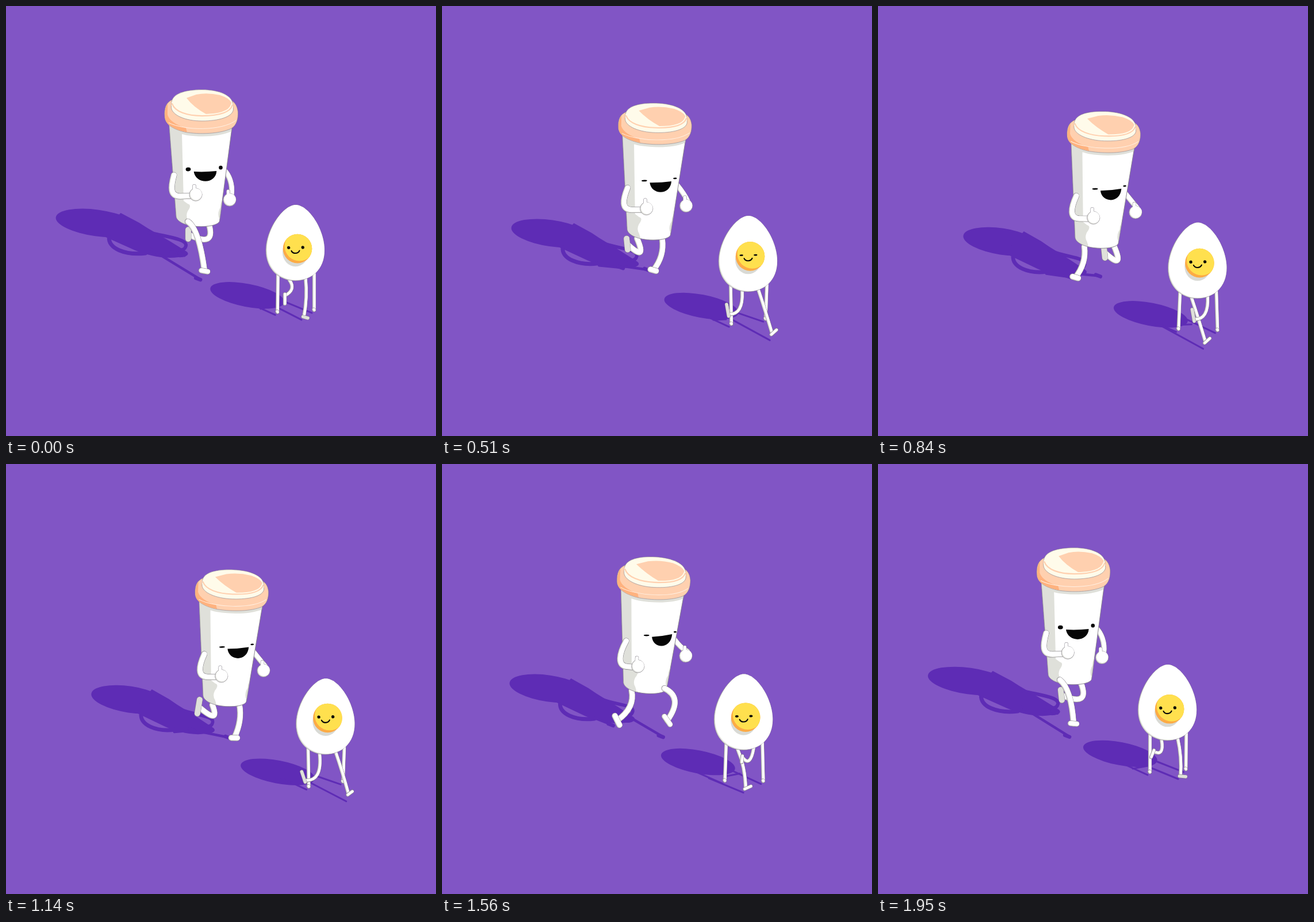
Recreate the animation shown at these times as an HTML page with a canvas. Size 748 by 748 pixels, loop 1.98 s.

```html
<!DOCTYPE html>
<html lang="en">
<head>
<meta charset="utf-8">
<title>Breakfast walk</title>
<style>
html, body { margin: 0; width: 100%; height: 100%; overflow: hidden; background: #8155c5; }
canvas { display: block; width: 748px; height: 748px; }
</style>
</head>
<body>
<canvas id="stage" width="748" height="748"></canvas>
<script>
const ctx = document.getElementById('stage').getContext('2d');
const LOOP = 1980, STRIDE = 660, STEP = 30, TAU = Math.PI * 2;
const BG = '#8155c5', SHADE = '#5e2cb5', WHITE = '#ffffff', GRAY = '#dfe0da', LINE = '#85808a', INK = '#060606';
const PEACH = '#ffd0af', ORANGE = '#ffb27f', CREAM = '#fffbea';

// One stride of a leg: phase, knee x y, ankle x y, toe x y, shadow drop
const CUP_STRIDE = [
  [0, 17, 28, 29, 86, 5.5, 1, 14],
  [.25, -1, 28, -12.5, 55, 5, .5, -1],
  [.364, -3, 28, -25, 52, 4, 8, 8],
  [.409, -2, 29, -29, 45, 3.5, 9, 14],
  [.455, 0, 27, -34, 21, 1, 9, 30],
  [.5, -3, 25, -36, 17, 0, 8, 35],
  [.727, 1, 19, -24, 3, -2, 12, 41],
  [.773, 5, 24, -17, 10, 1, 9.5, 41],
  [.864, 18, 22, 5, 56, 5, 7, 28],
  [.909, 16, 23, 18, 76, 5.5, 1, 22],
  [.955, 16, 27, 24, 76, 5.5, .5, 22]
];
const EGG_STRIDE = [
  [0, 4, 15, -8, 27, 0, 14, 10],
  [.25, 12, 37, 24, 76, 7, -6, 8],
  [.364, 10, 32, 14, 68, 9, -4, 3],
  [.409, 9, 28, 10, 67, 9, -2, 2],
  [.455, 5, 33, 5, 66, 9, 1, 1],
  [.5, 1, 33, -3, 67, 7, 2, 1],
  [.727, -4, 36, -26, 46, -5, -15, 2],
  [.773, -5, 31, -24, 40, -3, -17, 5],
  [.864, -8, 22, -20, 16, -1, 9, 25],
  [.909, -3, 18, -15, 13, -1, 9, 30],
  [.955, -1, 20, -14, 20, -4, 10, 20]
];

const P = d => new Path2D(d);
const CUP = P('M283.5 203L296 366C297 375 313 383 336 383.5C355 384 370 380 371.5 374L394 205Z');
const RIM = P('M289 163C278 168 275 178 276 192C276 205 290 215 315 220C345 224 375 221 392 213C402 207 404 195 403.5 184C402 172 397 166 388 162Z');
const RIM_DARK = P('M281 169C273 185 275 204 286 209C295 215 305 218 315 219.5L313 212C298 208 284 200 281 189Z');
const RIM_LINE = P('M283 203C310 217 375 218 400 199');
const CAP = P('M288 167C290 152 312 145.5 341 145.5C370 145.5 393 155 394.5 170L395.5 180C394 193 370 200 341 200C312 200 289 190 287.5 177Z');
const CAP_EDGE = P('M289 170C294 184 315 191 341 191C368 191 390 186 394 172');
const EGG = P('M1 0C23 0 51 42 51 79C51 112 28 132 0 132C-28 132 -51 112 -51 79C-51 42 -21 0 1 0Z');
const CUP_SHADOW = P('M200 360L232 377L246 386L285 409L314 427C322 433 310 438 300 437C275 441 245 433 225 425L165 398Z');

function fill(path, color, line) {
  ctx.fillStyle = color;
  ctx.fill(path);
  if (line) stroke(path, line, .6);
}

function stroke(path, color, width) {
  ctx.strokeStyle = color;
  ctx.lineWidth = width;
  ctx.stroke(path);
}

function oval(x, y, rx, ry = rx, rot = 0) {
  const p = new Path2D();
  p.ellipse(x, y, rx, ry, rot, 0, TAU);
  return p;
}

function within(path, draw) {
  ctx.save();
  ctx.clip(path);
  draw();
  ctx.restore();
}

function tube(path, width, color = WHITE) {
  stroke(path, LINE, width + .8);
  stroke(path, GRAY, width - .3);
  ctx.save();
  ctx.translate(.7, -.3);
  stroke(path, color, width - 1.9);
  ctx.restore();
}

// Smooth periodic interpolation through a stride table
function sample(rows, phase) {
  const n = rows.length, p = ((phase % 1) + 1) % 1;
  let i = n - 1;
  while (rows[i][0] > p) i--;
  const row = k => rows[(k + n) % n];
  const at = k => row(k)[0] + Math.floor(k / n);
  const span = at(i + 1) - at(i), u = (p - at(i)) / span;
  return rows[0].map((_, c) => {
    const a = row(i)[c], b = row(i + 1)[c];
    const ma = (b - row(i - 1)[c]) / (at(i + 1) - at(i - 1)) * span;
    const mb = (row(i + 2)[c] - a) / (at(i + 2) - at(i)) * span;
    const u2 = u * u, u3 = u2 * u;
    return a * (2 * u3 - 3 * u2 + 1) + ma * (u3 - 2 * u2 + u) + b * (3 * u2 - 2 * u3) + mb * (u3 - u2);
  }).slice(1);
}

function makeLeg(rows, phase, hx, hy, heel) {
  const [kx, ky, ax, ay, tx, ty, drop] = sample(rows, phase);
  const x = hx + ax, y = hy + ay;
  return {
    phase: phase % 1, hx, hy, x, y, drop,
    limb: P(`M${hx} ${hy}Q${hx + 2 * kx - ax / 2} ${hy + 2 * ky - ay / 2} ${x} ${y}`),
    foot: P(`M${x - heel * tx} ${y - heel * ty}L${x + tx} ${y + ty}`)
  };
}

function drawLeg(leg, width, footWidth) {
  const lifted = leg.phase > .45 && leg.phase < .83;
  tube(leg.limb, width);
  tube(leg.foot, footWidth, lifted ? GRAY : WHITE);
}

// Eyes: shut goes from 0 (open) to 1 (a dash)
function eye(x, y, rx, ry, shut) {
  fill(oval(x, y, rx + shut * .5, ry + (1.4 - ry) * shut, -.05), INK);
}

const ramp = (t, a, b) => Math.min(1, Math.max(0, (t - a) / (b - a)));

function cupShadow(m, legs) {
  const head = 63 * m.s + 12 * m.w ** 3 - 1;
  ctx.save();
  ctx.translate(87 + head, 34 * m.s);
  ctx.scale((231 + 49 * m.s - head) / 231, 1);
  ctx.translate(-87, 0);
  fill(oval(159, 377.5, 72, 23, .14), SHADE);
  fill(CUP_SHADOW, SHADE);
  stroke(P('M180 402C178 422 208 434 243 430'), SHADE, 7);
  stroke(P('M250 394C280 ' + (402 + 6 * m.w) + ' 315 405 313 417C311 427 300 425 293 423'), SHADE, 6);
  ctx.restore();
  ctx.save();
  ctx.translate(m.x, m.y);
  for (const l of legs) {
    const tx = l.x - 8, ty = l.y + l.drop;
    stroke(P(`M${l.hx - 66} ${l.hy + 47}L${tx} ${ty}`), SHADE, 4.5);
    stroke(P(`M${tx - 7} ${ty - 2}L${tx + 1} ${ty + 1}`), SHADE, 6.5);
  }
  ctx.restore();
}

function hand(x, y) {
  const thumb = P(`M${x - 2.5} ${y - 6}L${x - 2.5} ${y - 15}`);
  stroke(thumb, LINE, 6.4);
  fill(oval(x, y, 11.2), GRAY, LINE);
  fill(oval(x + .7, y - .7, 10.2), WHITE);
  stroke(thumb, WHITE, 5.4);
}

function cupFace(m) {
  const d = 8.3 * (1 - m.cos) + .8 * m.sin, k = d / 16;
  const shut = ramp(m.t, 400, 470) * (1 - ramp(m.t, 1620, 1710));
  const cx = 346.5 + .87 * d, r = 19.8 - 2.6 * k;
  const left = 288 - 2 * k, right = 287 - 8 * k, low = 304 - 4 * k;
  const bend = low + (low - (left + right) / 2) / 3 + 1;
  fill(P(`M${cx - r} ${left}Q${cx} ${(left + right) / 2 + 1.5} ${cx + r} ${right}` +
    `C${cx + r - 1} ${bend} ${cx - r + 3} ${bend} ${cx - r} ${left}Z`), INK);
  eye(317 + 1.05 * d, 284, 4.4, 3.4, shut);
  eye(373.5 + .55 * d, 281 - 6 * k, 3.3 - 1.5 * k, 3.4, shut);
}

function cupLid(m) {
  fill(RIM, PEACH, LINE);
  within(RIM, () => fill(RIM_DARK, ORANGE));
  stroke(RIM_LINE, '#fff1e4', 1);
  fill(CAP, CREAM, LINE);
  within(CAP, () => {
    const a = 7 * m.w;
    fill(P(`M${314 - a} 160L${331 - a / 2} 154Q350 150 372 155Q388 160 392 168L391 179Q384 184 372 187L348 188Q326 176 ${314 - a} 160Z`), PEACH);
    stroke(CAP_EDGE, CREAM, 6);
    stroke(CAP_EDGE, PEACH, 2.2);
  });
}

function drawCup(m, legs) {
  const front = l => l.phase > .83 || l.phase < .15;
  const w3 = m.w ** 3, q = Math.sin(m.w * Math.PI / 2);
  const place = draw => {
    ctx.save();
    ctx.translate(m.x, m.y);
    draw();
    ctx.restore();
  };
  // The lid foreshortens as the cup tips back on each landing
  const squash = () => {
    ctx.translate(0, 145.5);
    ctx.scale(1, 1 - .065 * m.pitch);
    ctx.translate(0, -145.5);
  };
  place(() => legs.filter(l => !front(l)).forEach(l => drawLeg(l, 10, 10)));
  place(() => {
    ctx.translate(335.5, 383);
    ctx.rotate(m.lean);
    ctx.translate(-335.5, -383);
    const rx = 389 + 13.5 * q, ry = 337 - 23 * q;
    tube(P(`M380 286C387 ${293 + 2 * q} ${395 + q} ${309 - 6 * q} ${rx + 3 - q} ${ry - 8}`), 9);
    hand(rx, ry);
    fill(CUP, WHITE, LINE);
    within(CUP, () => {
      const edge = 306 - 4 * m.w;
      fill(P(`M270 190L${edge} 190L${edge} 222L309 339L316 344Q324 346 316 357Q312 366 317 373L322 388L270 388Z`), GRAY);
      fill(P('M384 328Q372 340 373 350Q368 358 370 368L384 368Z'), GRAY);
      squash();
      ctx.translate(0, 5);
      fill(RIM, GRAY);
    });
    stroke(CUP, LINE, .6);
    ctx.save();
    squash();
    cupLid(m);
    ctx.restore();
    ctx.save();
    ctx.translate(0, -3.5 * m.pitch);
    cupFace(m);
    ctx.restore();
    const hx = 330 - 18 * w3, hy = 328 + 16 * w3, sx = 292 + 6 * m.w;
    tube(P(`M${sx} 294C${286 + m.w - 3 * w3} ${316 + 4 * w3} ${285 + m.w - 3 * w3} ${331 + 12 * w3} ${303 - 6 * w3} ${331 + 13 * w3}L${hx - 6} ${hy + 2}`), 10);
    hand(hx, hy);
  });
  place(() => legs.filter(front).forEach(l => drawLeg(l, 10, 9)));
}

function drawEgg(m) {
  const h = m.p * 2;
  const bob = 10.5 * ((1 + Math.cos(TAU * (h - .71))) / 2) ** 2;
  const x = 55.5 * m.s, y = 28 * m.s + bob - .6;
  const yolkY = 72.8 + 4.5 * Math.sin(TAU * (h - .64));
  const post = (hx, hy, dx, len) => ({
    hx, hy, x: hx + dx, y: hy + len, drop: 1, phase: 0,
    limb: P(`M${hx} ${hy}L${hx + dx} ${hy + len}`),
    foot: P(`M${hx + dx - .6} ${hy + len - 1}L${hx + dx} ${hy + len}`)
  });
  const legs = [
    post(473, 466, -.7 - 2 * m.sin, 65.5 - 1.5 * m.sin),
    post(536, 464, 2.2 * m.sin, 64 + 4 * m.sin),
    makeLeg(EGG_STRIDE, m.p, 493, 476, .2),
    makeLeg(EGG_STRIDE, m.p + .5, 521, 473, .2)
  ];

  ctx.save();
  ctx.translate(x + .5 * bob, 34 * m.s + .2 * bob);
  fill(oval(419, 503, 65.5, 20, .19), SHADE);
  ctx.restore();

  ctx.save();
  ctx.translate(x, y);
  for (const l of legs) {
    stroke(P(`M${l.hx - 50} ${l.hy + 50}L${l.x - 4} ${l.y + 4 + l.drop}`), SHADE, 3);
  }
  legs.forEach(l => drawLeg(l, 5.6, 5.6));

  ctx.translate(503, 345);
  fill(EGG, GRAY, LINE);
  within(EGG, () => {
    ctx.translate(1.8, -1.2);
    fill(EGG, WHITE);
  });

  ctx.translate(4, yolkY);
  fill(oval(-3.5, 6.5, 22.5, 24.5), '#d9dad5');
  const yolk = oval(0, 0, 25.3);
  fill(yolk, '#fcab45');
  within(yolk, () => fill(oval(3.6, -4.6, 26), '#ffe04e'));
  const blink = Math.max(0, 1 - Math.abs(m.t - 510) / 100, .95 - Math.abs(m.t - 1600) / 100);
  eye(-15.3, -1.8, 2.7, 2.7, blink);
  eye(9.3, -2.2, 2.7, 2.7, blink);
  stroke(P('M-10.5 3.8C-8 9.3 1 9.3 3.5 3.4'), INK, 2.1);
  ctx.restore();
}

function render(t) {
  const p = (t % STRIDE) / STRIDE, a = TAU * p;
  const cos = Math.cos(a), sin = Math.sin(a), cos2 = Math.cos(2 * a);
  const s = (1 - Math.cos(TAU * t / LOOP)) / 2;
  const pitch = (1 - Math.cos(2 * a + .26)) / 2;
  const m = {
    t, p, cos, sin, s, pitch,
    w: (1 - cos) / 2,
    lean: 6 * (1 - cos) / 200,
    x: 49 * s,
    y: 34 * s + 6 * pitch
  };
  const legs = [
    makeLeg(CUP_STRIDE, p + .5, 361 - 8 * cos + 2.5 * sin, 378 + 6 * cos - 4 * cos2, 1),
    makeLeg(CUP_STRIDE, p, 313 + 3.2 * cos, 378 - 3 * cos2, 1)
  ];
  ctx.fillStyle = BG;
  ctx.fillRect(0, 0, 748, 748);
  ctx.lineCap = ctx.lineJoin = 'round';
  cupShadow(m, legs);
  drawCup(m, legs);
  drawEgg(m);
}

function tick() {
  render(Math.floor(performance.now() % LOOP / STEP) * STEP);
  requestAnimationFrame(tick);
}
tick();
</script>
</body>
</html>
```
